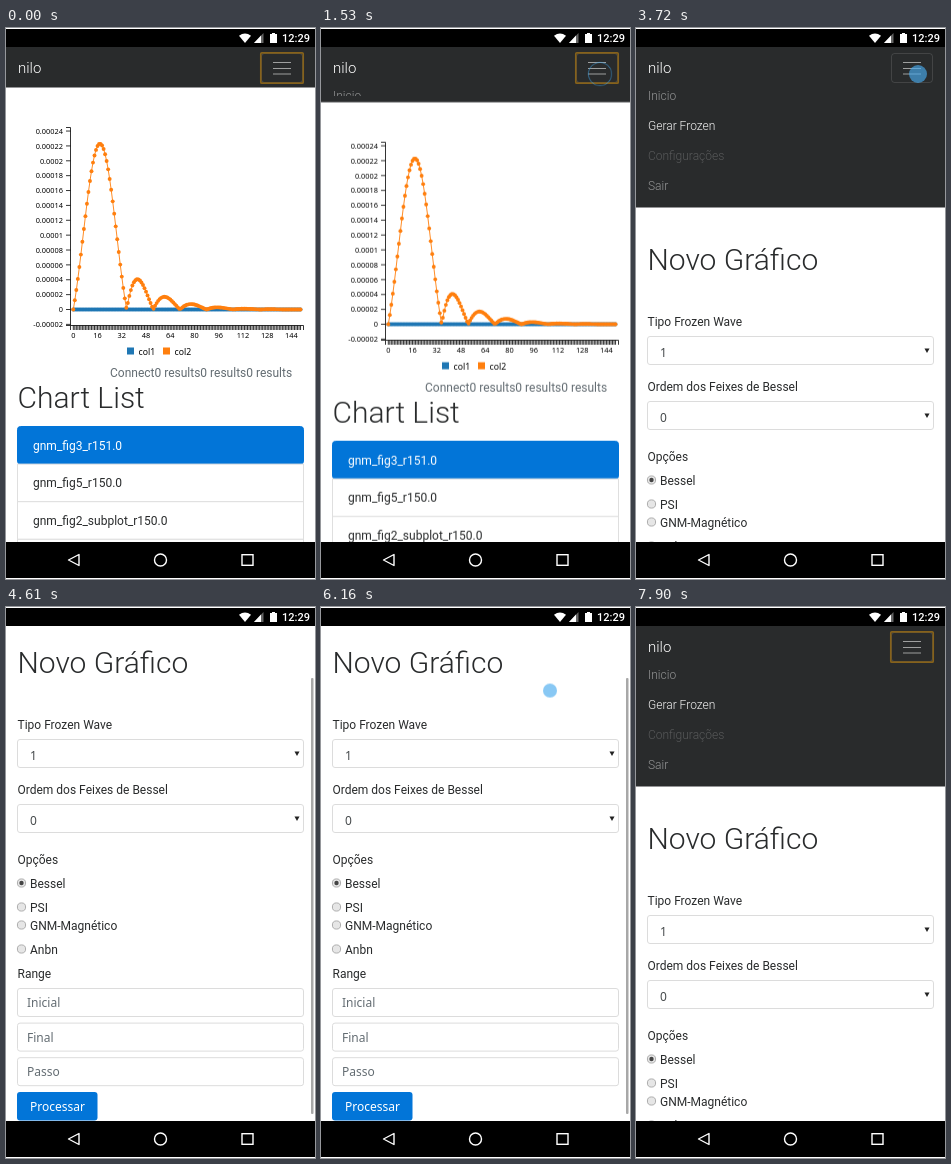
An HTML page that plays this animation: 309 by 551 pixels, repeating every 8 s.

```html
<!DOCTYPE html>
<html lang="pt">
<head>
<meta charset="utf-8">
<title>Novo Gráfico</title>
<style>
  html, body { margin: 0; width: 100%; height: 100%; overflow: hidden; background: #fff; }
  svg { display: block; width: 100vw; height: 100vh; }
  text { font: 12px Roboto, sans-serif; fill: #292b2c; white-space: pre; }
  .title { font-size: 30px; font-weight: 300; }
  .brand { font-size: 15px; font-weight: 300; fill: #fff; }
  .link { font-weight: 300; fill: #fff; }
  .field { font-family: "Noto Sans", sans-serif; fill: #464a4c; }
  .hint { font-family: "Noto Sans", sans-serif; fill: #636c72; }
  .axis { font: 7.4px "Noto Sans", sans-serif; fill: #000; }
  .legend { font: 8.7px "Noto Sans", sans-serif; fill: #000; }
  .box { fill: #fff; stroke: #dcdcdc; }
</style>
</head>
<body>
<svg viewBox="0 0 309 551" xmlns="http://www.w3.org/2000/svg">
  <defs><clipPath id="view"><rect y="19" width="309" height="495"/></clipPath></defs>
  <rect width="309" height="551" fill="#fff"/>

  <g clip-path="url(#view)">
    <g id="scroll">
      <rect y="19" width="309" height="161" fill="#292b2c"/>
      <g id="menu"></g>
      <g id="page">
        <rect y="53" width="309" height="6.5" fill="#292b2c"/>
        <rect y="59.5" width="309" height="900" fill="#fff"/>
        <g id="chart">
          <g id="plot"></g>
          <text x="104" y="349" style="fill:#636c72">Connect0 results0 results0 results</text>
          <text class="title" x="11.5" y="380">Chart List</text>
          <g id="list"></g>
        </g>
        <g id="form"></g>
      </g>
      <text class="brand" x="12" y="45">nilo</text>
      <rect x="255.5" y="25.5" width="41" height="29" rx="3" fill="none" stroke="#fff" stroke-opacity=".12"/>
      <path d="M267 34.5h18M267 40.5h18M267 46h18" stroke="#fff" stroke-opacity=".55" stroke-width="1.2"/>
      <rect id="focus" x="254.8" y="24.8" width="42.4" height="30.4" rx="1" fill="none" stroke="#86621b" stroke-width="1.7"/>
    </g>
    <rect id="bar" x="305" y="23" width="2.5" height="436" rx="1" fill="#a8a8a8"/>
  </g>

  <rect y="1" width="309" height="18" fill="#000"/>
  <rect y="514" width="309" height="36" fill="#000"/>
  <path d="M233 7.8Q239 3 245 7.8L239 15z" fill="#fff"/>
  <path d="M248 15h9.5V5z" fill="#666"/>
  <path d="M248 15h7V7.6z" fill="#fff"/>
  <path d="M264 6h2V5h3v1h2v9h-7z" fill="#fff"/>
  <text x="276" y="14" style="font-size:11px;font-weight:500;fill:#fff">12:29</text>
  <g fill="none" stroke="#fff" stroke-width="1.4">
    <path d="M73 526.5v11L62.5 532z" stroke-linejoin="round"/>
    <circle cx="154.5" cy="532" r="6"/>
    <rect x="236" y="526.7" width="11" height="10.6"/>
  </g>
  <g id="touches"></g>
</svg>
<script>
const LOOP = 8000;
const $ = id => document.getElementById(id);

function add(parent, tag, attrs, label) {
  const el = document.createElementNS('http://www.w3.org/2000/svg', tag);
  for (const key in attrs) el.setAttribute(key, attrs[key]);
  if (label !== undefined) el.textContent = label;
  parent.append(el);
  return el;
}
const write = (parent, x, y, label, attrs) => add(parent, 'text', { x, y, ...attrs }, label);

// Rows are [time, value, easing towards the next row].
function track(el, prop, rows, format = v => v) {
  const all = [[0, rows[0][1]], ...rows, [LOOP, rows[rows.length - 1][1]]];
  el.animate(all.map(([time, value, easing = 'linear']) =>
    ({ offset: time / LOOP, [prop]: format(value), easing })),
    { duration: LOOP, iterations: Infinity });
}
const shiftY = v => `translateY(${v}px)`;

function buildMenu() {
  [['Inicio', .5], ['Gerar Frozen', .95], ['Configurações', .22], ['Sair', .5]].forEach(([label, alpha], i) =>
    write($('menu'), 12, 72 + 30 * i, label, { class: 'link', 'fill-opacity': alpha }));
}

function buildPlot() {
  const plot = $('plot');
  const px = n => 67.3 + n * 1.515;
  const py = v => 281.5 - v * 14.87;   // v in units of 0.00002
  const wave = n => {
    const d = n - 17.6, a = Math.PI * d / 17.6;
    return 11.15 * Math.abs(a ? Math.sin(a) / a : 1) * Math.exp(-.00028 * d * d);
  };
  const indices = Array.from({ length: 151 }, (_, n) => n);

  let axes = 'M60 99.5H64.5V297.5H60M64.5 302V297.5H297.5V302';
  for (let v = -1; v <= 12; v++) {
    const label = v ? String(+(v * .00002).toFixed(5)) : '0';
    const plain = Math.abs(v) > 0 ? (v * .00002).toFixed(5).replace(/0+$/, '') : label;
    write(plot, 57, py(v) + 2.7, plain, { class: 'axis', 'text-anchor': 'end' });
    axes += `M60 ${py(v)}H64.5`;
  }
  for (const n of indices) axes += `M${px(n)} 297.5V302`;
  add(plot, 'path', { d: axes, fill: 'none', stroke: '#000', 'stroke-width': .8 });
  for (let n = 0; n <= 144; n += 16)
    write(plot, px(n), 310, n, { class: 'axis', 'text-anchor': 'middle' });

  [['#1f77b4', () => 0], ['#ff7f0e', wave]].forEach(([color, f], i) => {
    const points = indices.map(n => [px(n), py(f(n))]);
    add(plot, 'polyline', { points: points.join(' '), fill: 'none', stroke: color, 'stroke-width': .9 });
    for (const [cx, cy] of points) add(plot, 'circle', { cx, cy, r: 1.95, fill: color });
    add(plot, 'rect', { x: 121 + 36 * i, y: 319.5, width: 7, height: 7, fill: color });
    write(plot, 132.5 + 36 * i, 327, 'col' + (i + 1), { class: 'legend' });
  });
}

function buildList() {
  ['gnm_fig3_r151.0', 'gnm_fig5_r150.0', 'gnm_fig2_subplot_r150.0', ''].forEach((label, i) => {
    const y = 398.5 + 37.6 * i;
    add($('list'), 'rect', { x: 11.5, y, width: 286, height: 37.6, rx: i ? 0 : 3,
      fill: i ? '#fff' : '#0275d8', stroke: i ? '#dfdfdf' : '#0275d8' });
    write($('list'), 27, y + 23, label, i ? {} : { style: 'fill:#fff' });
  });
}

function buildForm() {
  const form = $('form');
  const box = y => add(form, 'rect', { class: 'box', x: 11.5, y, width: 286, height: 28, rx: 2.5 });
  write(form, 11.5, 122, 'Novo Gráfico', { class: 'title' });
  [['Tipo Frozen Wave', 178], ['Ordem dos Feixes de Bessel', 243], ['Opções', 313], ['Range', 427]]
    .forEach(([label, y]) => write(form, 11.5, y, label));
  [['1', 188.5], ['0', 253.5]].forEach(([value, y]) => {
    box(y);
    write(form, 24, y + 20, value, { class: 'field' });
    add(form, 'path', { d: `M288.5 ${y + 12}h5l-2.5 4.5z`, fill: '#222' });
  });
  [['Bessel', 332], ['PSI', 356], ['GNM-Magnético', 374], ['Anbn', 398]].forEach(([label, cy], i) => {
    add(form, 'circle', { cx: 15.5, cy, r: 4.1, fill: '#e6e6e6', stroke: '#a5a5a5', 'stroke-width': .9 });
    if (!i) add(form, 'circle', { cx: 15.5, cy, r: 2.2, fill: '#444' });
    write(form, 24, cy + 5, label);
  });
  ['Inicial', 'Final', 'Passo'].forEach((label, i) => {
    const y = 437.5 + 34.6 * i;
    box(y);
    write(form, 21, y + 18.5, label, { class: 'hint' });
  });
  add(form, 'rect', { x: 11, y: 541, width: 80.5, height: 28.5, rx: 3, fill: '#0275d8' });
  write(form, 24, 560, 'Processar', { class: 'field', style: 'fill:#fff' });
}

// A blue dot while pressed, then an expanding ring.
function touch(start, end, x, y, dy = 0) {
  const g = add($('touches'), 'g');
  const dot = add(g, 'circle', { cx: x, cy: y, r: dy ? 7 : 9, fill: '#48abee', 'fill-opacity': .65 });
  track(dot, 'opacity', [[start, 0], [start, 1], [end, 1], [end, 0]]);
  if (dy) return track(dot, 'transform', [[start, 0], [end, dy]], shiftY);
  const ring = add(g, 'circle', { cx: x, cy: y, r: 12, fill: 'none', stroke: '#3f9bd8' });
  ring.style.transformOrigin = `${x}px ${y}px`;
  track(ring, 'opacity', [[end, 0], [end, .9], [end + 220, 0]]);
  track(ring, 'transform', [[end, .8], [end + 220, 1.25]], v => `scale(${v})`);
}

buildMenu();
buildPlot();
buildList();
buildForm();

track($('page'), 'transform', [
  [825, 0, 'ease'], [1175, 120], [1325, 120, 'ease'], [1675, 0], [1705, 0, 'ease'], [2055, 120],
  [3745, 120, 'ease'], [4095, 0], [7550, 0, 'ease'], [7900, 120]
], shiftY);

const scrolled = [
  [4090, 0, 'ease-out'], [4240, 1], [4700, 1, 'ease-in-out'], [5350, 0],
  [5600, 0, 'ease-out'], [5730, 1], [6180, 1, 'ease-in-out'], [6620, 0],
  [6950, 0, 'ease-out'], [7110, 1], [7160, 1, 'ease-in-out'], [7480, 0]
];
track($('scroll'), 'transform', scrolled, v => shiftY(-56 * v));
track($('bar'), 'transform', scrolled, v => shiftY(48 * v));
track($('bar'), 'opacity', [
  [4090, 0], [4090, 1], [5300, 1], [5410, 0], [5605, 0], [5605, 1], [6560, 1], [6640, 0],
  [6955, 0], [6955, 1], [7440, 1], [7540, 0]
]);

track($('chart'), 'opacity', [[2510, 1], [2660, 0]]);
track($('form'), 'opacity', [[2660, 0], [2820, 1]]);
track($('focus'), 'opacity', [[2525, 1], [2525, 0], [3745, 0], [3745, 1]]);

touch(845, 930, 279, 46);
touch(1325, 1450, 279, 46);
touch(1705, 1800, 279, 46);
touch(2520, 2600, 44, 91);
touch(3710, 3800, 282, 46);
touch(4090, 4240, 230, 290, -90);
touch(4690, 5100, 229, 90, 75);
touch(5600, 5730, 230, 290, -90);
touch(6150, 6450, 229, 81, 70);
touch(6955, 7100, 230, 290, -90);
touch(7150, 7400, 229, 90, 75);
touch(7540, 7620, 281, 46);
</script>
</body>
</html>
```
